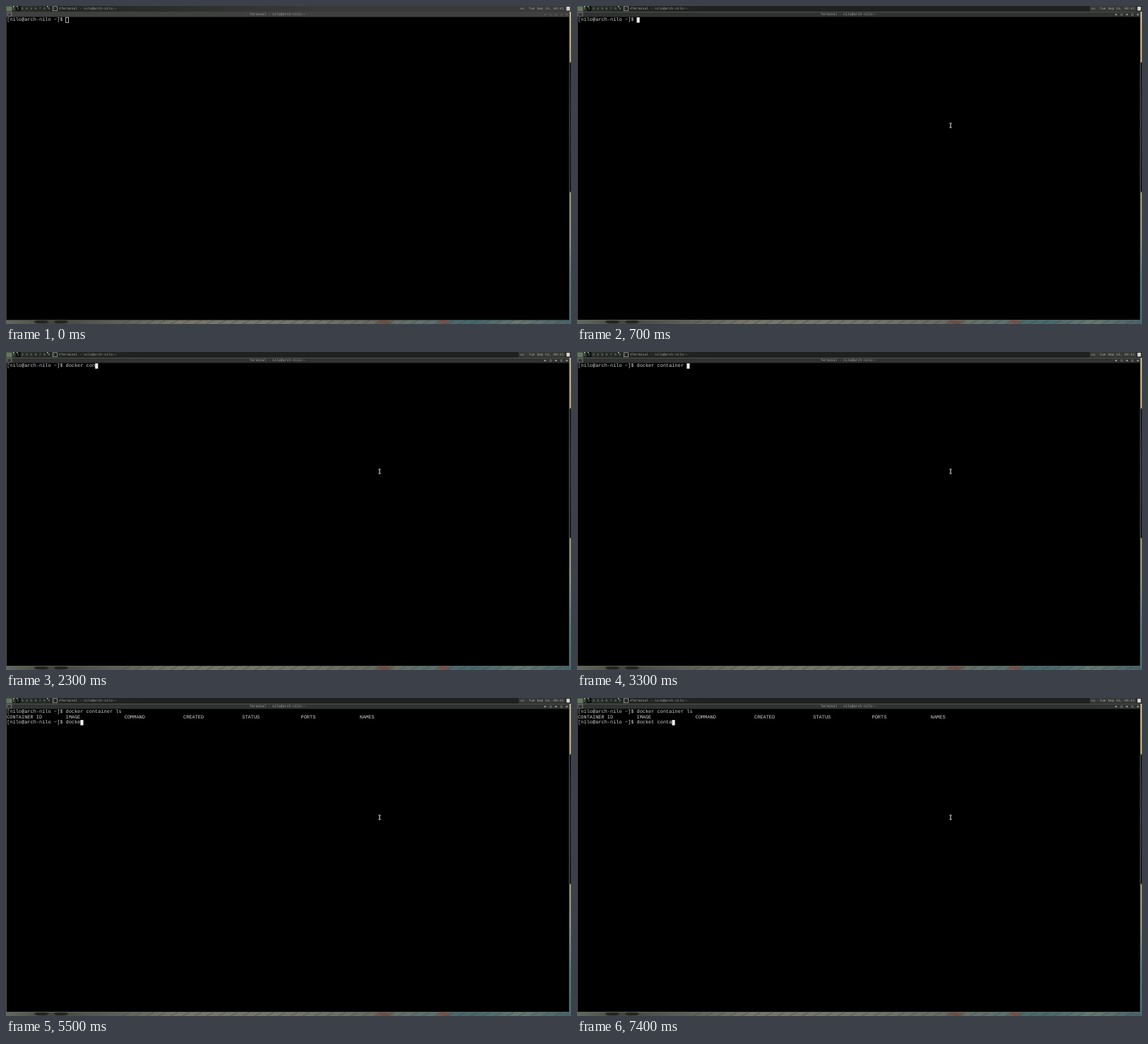
An HTML page with a canvas for the animation above (8 s loop, 800x450 px).

```html
<!DOCTYPE html>
<html lang="en">
<head>
<meta charset="utf-8">
<title>Terminal session</title>
<style>
  html, body { margin: 0; width: 100%; height: 100%; overflow: hidden; background: #000; }
  canvas { display: block; }
</style>
</head>
<body>
<canvas id="stage" width="800" height="450"></canvas>
<script>
const ctx = document.getElementById('stage').getContext('2d');
ctx.textRendering = 'geometricPrecision';

const LOOP = 8000;
const CELL = 800 / 192, ROW = 7.5, LEFT = 1.2, TOP = 16.1;
const HOST = 'nilo@arch-nilo';
const PROMPT = `[${HOST} ~]$ `;
const HEADER = ['CONTAINER ID', 'IMAGE', 'COMMAND', 'CREATED', 'STATUS', 'PORTS', 'NAMES']
  .map(name => name.padEnd(20)).join('').trimEnd();

// Each entry appends its text at the given time; \b erases one character.
const keys = [
  [1300, 'd'], [1400, 'o'], [1500, 'c'], [1600, 'k'], [1700, 'e'], [1800, 'r'],
  [2000, ' '], [2100, 'c'], [2200, 'o'], [2300, 'n'], [2600, 't'], [3000, 'a'],
  [3200, 'i'], [3300, 'ner '], [3900, 'l'], [4000, 's'], [4200, '\n'],
  [4300, HEADER + '\n' + PROMPT],
  [5100, 'd'], [5200, 'o'], [5300, 'c'], [5400, 'k'], [5500, 'e'], [6000, 't'],
  [6200, ' '], [6300, 'c'], [6400, 'o'], [6600, 'n'], [7100, '\b'],
  [7300, 'nt'], [7400, 'a']
];

function rect(x, y, w, h, color) {
  ctx.fillStyle = color;
  ctx.fillRect(x, y, w, h);
}

function frame(x, y, w, h, color, width = 0.7) {
  ctx.strokeStyle = color;
  ctx.lineWidth = width;
  ctx.strokeRect(x, y, w, h);
}

function text(string, x, y, size, color) {
  ctx.font = `${size}px "Liberation Mono", monospace`;
  ctx.fillStyle = color;
  ctx.fillText(string, x, y);
}

function gradient(x, y, w, h, stops) {
  const fill = ctx.createLinearGradient(x, y, w > h ? x + w : x, w > h ? y : y + h);
  stops.forEach(([at, color]) => fill.addColorStop(at, color));
  rect(x, y, w, h, fill);
}

function wallpaper() {
  gradient(0, 444, 800, 6, [
    [0, '#62685f'], [0.04, '#555a50'], [0.07, '#42443e'], [0.11, '#4a4d46'], [0.2, '#5d6058'],
    [0.3, '#76776a'], [0.5, '#74766b'], [0.65, '#686b62'], [0.67, '#6d4a40'], [0.69, '#667068'],
    [0.76, '#5a716f'], [0.775, '#7c4a42'], [0.79, '#4b6a6f'], [0.84, '#47686f'],
    [0.91, '#667a73'], [1, '#466069']
  ]);
  ctx.strokeStyle = '#42463fb0';
  ctx.lineWidth = 1;
  ctx.beginPath();
  for (let x = 165; x < 780; x += 17) {
    ctx.moveTo(x, 450);
    ctx.lineTo(x + 10, 445);
  }
  ctx.stroke();
  for (const x of [50, 78]) {
    ctx.fillStyle = '#24251f';
    ctx.beginPath();
    ctx.ellipse(x, 447, 10, 2.3, 0, 0, 7);
    ctx.fill();
  }
  gradient(798, 8, 2, 442, [
    [0, '#b9b08e'], [0.06, '#bfac6c'], [0.16, '#b5a468'], [0.165, '#15191d'], [0.35, '#20272b'],
    [0.575, '#15191c'], [0.58, '#94946f'], [0.72, '#87937f'], [0.85, '#55777c'], [1, '#466a73']
  ]);
}

function panel(active) {
  const base = active ? '#1f2120' : '#383938';
  gradient(0, 0, 800, 8, [[0, '#2c322c'], [0.1, '#222522'], [0.25, active ? base : '#2a2c2a'], [0.55, base], [1, base]]);
  if (active) rect(726, 0, 66, 7.5, '#363836');
  rect(0.5, 0.5, 8, 7, '#66785f');
  rect(14, 0, 6.5, 7, '#0d100d');
  for (let i = 1; i <= 9; i++) text(i, 9.2 + (i - 1) * 6.25, 5, 4.86, '#84978a');
  for (const x of [10, 15, 58]) rect(x, 0, 1.5, 1.5, '#c4cbc2');
  rect(66, 0.7, 7, 6.2, '#171918');
  frame(66.3, 0.9, 6.3, 5.8, '#bfc2bd');
  text('>', 67.2, 4.8, 4, '#d0d3ce');
  text(`#Terminal - ${HOST}:~`, 75, 5, 4.86, '#a2a5a0');
  text('us', 728, 5, 4.86, '#a8aba6');
  text('Tue Sep 15, 00:41', 740, 5, 4.86, '#a8aba6');
  rect(793.5, 1, 5, 5.5, '#d3d5cc');
}

function titleBar(active, focused) {
  rect(0, 8, 798, 8, active ? '#303231' : '#404040');
  if (active) rect(0, 8, 798, 0.7, '#5d605d');
  frame(2, 9.3, 5.5, 5, '#9a9d98', 0.5);
  rect(8.5, 8, 0.6, 8, '#626462');
  text(`Terminal - ${HOST}:~`, 345, 13.4, 4.86, active ? '#a6a9a5' : '#9a9c9a');
  const color = focused ? '#8d908b' : '#555755';
  for (let i = 0; i < 5; i++) {
    const x = 762 + i * 7.7;
    if (i % 2) frame(x + 0.3, 11, 2.2, 2.2, color, 0.6);
    else rect(x, 11, 2.6, 2.2, color);
  }
}

function terminal(t, active, focused) {
  rect(0, 15.5, 798, 429, '#000');
  let screen = PROMPT;
  for (const [time, typed] of keys) {
    if (t < time) break;
    screen = typed === '\b' ? screen.slice(0, -1) : screen + typed;
  }
  const lines = screen.split('\n');
  lines.forEach((line, row) => text(line, LEFT, 21 + row * ROW, CELL / 0.6, '#d2d2d2'));
  const x = LEFT + lines.at(-1).length * CELL, y = TOP + (lines.length - 1) * ROW;
  if (focused) rect(x, y, CELL, ROW, '#f0f0f0');
  else frame(x + 0.1, y + 0.1, CELL - 0.2, ROW - 0.2, '#dedede', 0.8);
  const border = active ? '#646764' : '#484a48';
  rect(0, 8, 0.8, 437, border);
  rect(797, 8, 0.8, 437, border);
  rect(0, 444, 798, 0.9, border);
}

function pointer(t) {
  if (t < 100) return;
  const left = 1 - Math.min(1, Math.floor(t / 100) / 5);
  const x = 529 + 268 * left * left, y = 169 + 64 * left * left;
  rect(x - 0.6, y - 3.5, 1.2, 7, '#cfcfcf');
  for (const end of [-3.5, 2.5]) rect(x - 1.8, y + end, 3.6, 0.9, '#b8b8b8');
}

function draw(now) {
  const t = now % LOOP;
  const focused = t >= 200, active = t >= 700;
  wallpaper();
  panel(active);
  titleBar(active, focused);
  terminal(t, active, focused);
  pointer(t);
  requestAnimationFrame(draw);
}
requestAnimationFrame(draw);
</script>
</body>
</html>
```
